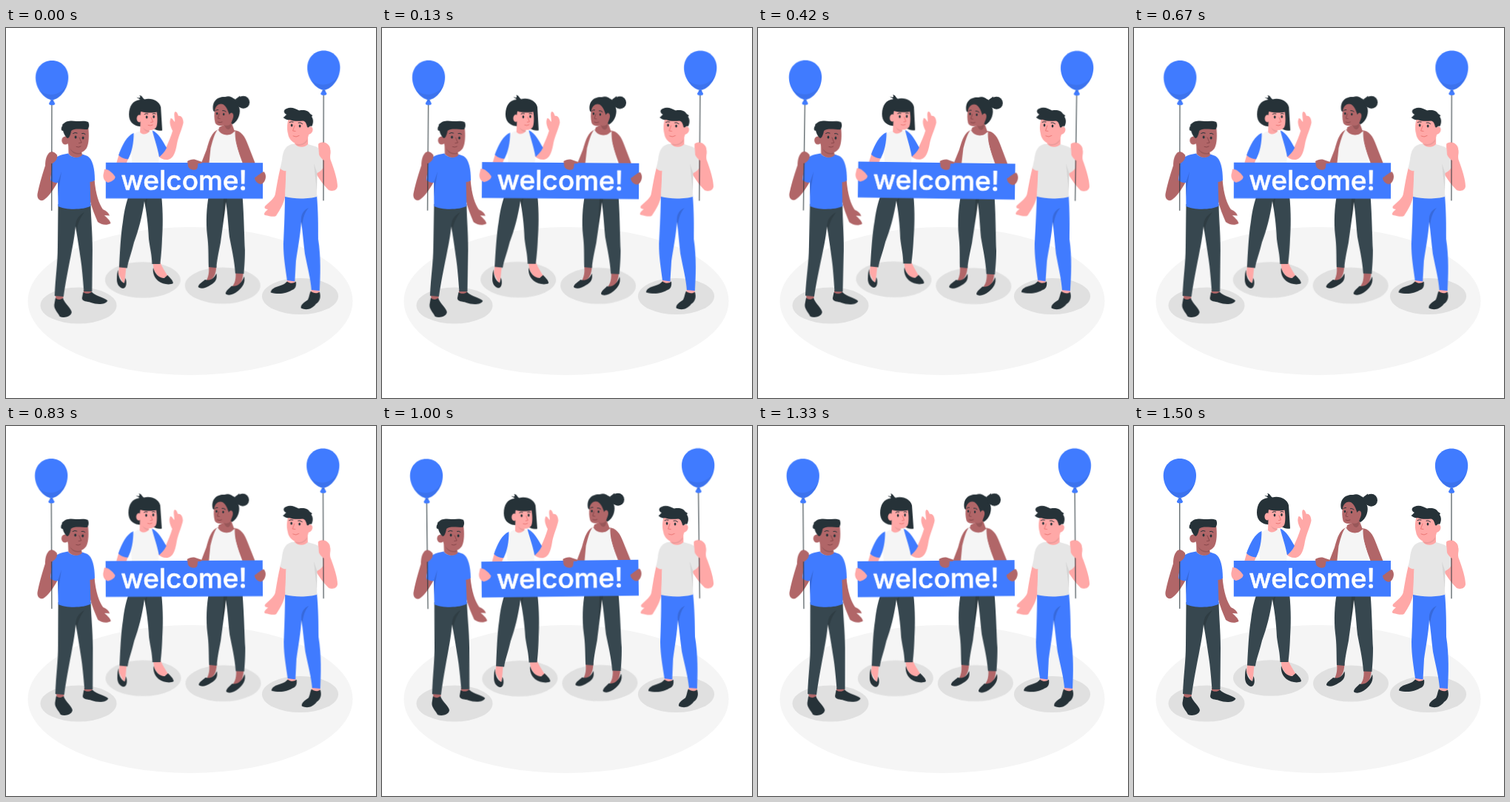
These frames come from a looping animation (500 px wide and 500 px high, 1.54 s). An HTML page:

```html
<!DOCTYPE html>
<html lang="en">
<head>
<meta charset="utf-8">
<title>Welcome</title>
<style>
  html, body { margin: 0; width: 100%; height: 100%; overflow: hidden; background: #fff; }
  svg { display: block; width: 100%; height: 100%; }
  .sway { animation: sway 1540ms linear -40ms infinite; }
  #manL { transform-origin: 91px 217px; }
  #women { transform-origin: 243px 231px; }
  #manR { transform-origin: 400px 206px; }
  @keyframes sway {
    0%, 100% { transform: rotate(0deg); }
    25% { transform: rotate(1deg); }
    75% { transform: rotate(-1deg); }
  }
  .floor { fill: #f5f5f5; }
  .shadow { fill: #e0e0e0; }
  .blue { fill: #407bff; }
  .dark { fill: #263238; }
  .slate { fill: #37474f; }
  .white { fill: #f5f5f5; }
  .grey { fill: #e6e6e6; }
  .pink { fill: #ffa8a7; }
  .brown { fill: #b16668; }
  .shade { fill: #000; opacity: .14; }
  .soft { opacity: .07; }
  .line { fill: none; stroke: #263238; stroke-width: 1; stroke-linecap: round; }
  .nose { fill: none; stroke: #7d3f43; stroke-width: .8; stroke-linecap: round; }
  .pinkNose { fill: none; stroke: #e8716f; stroke-width: .9; stroke-linecap: round; }
  .sign {
    font: 500 37px Inter, "Open Sans", sans-serif; text-anchor: middle;
    fill: #fff; stroke: #fff; stroke-width: .6; stroke-linejoin: round;
  }
</style>
</head>
<body>
<svg viewBox="0 0 500 500">
  <defs>
    <g id="balloon">
      <path class="line" d="M61.8 103V246.5"/>
      <path class="blue" d="M61.8 44C75 44 84 54 84 67C84 82 73 96 62 97.5C51 96 39.7 82 39.7 67C39.7 54 49 44 61.8 44Z"/>
      <path class="shade soft" d="M83 75C76 91 56 95 44 83C49 90 55 96 62 97.5C71 96 80 86 83 75Z"/>
      <path class="blue" d="M62 95L57.8 102Q58 104.500 62 104.300Q66 104.500 66 102Z"/>
      <path class="shade" d="M59 97L62 98L65 97L64 99H60Z"/>
    </g>
  </defs>

  <ellipse class="floor" cx="249" cy="369" rx="219.500" ry="100"/>
  <ellipse class="shadow" cx="98" cy="375" rx="51.500" ry="24.500"/>
  <ellipse class="shadow" cx="397.500" cy="362.500" rx="51.500" ry="24.500"/>

  <g id="manL" class="sway">
    <path class="brown" d="M67 360H78L77 370L68 370ZM105 354H116V361H105Z"/>
    <path class="dark" d="M67 365C71 368 75 367 77 365C80 373 88 378 89 384C88 391 78 392 73 390C70 384 65 380 65.500 374ZM104.500 357C109 360 113 359 116 356.500C122 363 134 364 137.500 368.500C135 374 123 374 115 371C110 369 103 370 103 365Z"/>
    <path class="slate" d="M70.500 238H114.500C115 262 117 275 117 300L116.500 356H105.500C104 338 103 325 101 312C99 298 97 285 94 268C92 292 84 322 78 363L66 362C67 335 70 320 70 295Z"/>
    <path class="shade" d="M94 268C94 259 98 253 106 249C101 256 97 262 95.500 276Z"/>
    <path class="brown" d="M112.500 205L119.500 204C121 225 126 238 131 245C136 247 139 250 140 253.500L133 253C137 257 141 260 141.500 264C136 267 129 266 124 262C120 253 116 243 113 231Z"/>
    <path class="brown" d="M58 169C62 166 66 168 69 172C70 177 66 180 63 184L60 206L70.500 207C64 219 57 229 50 233C44 234 41 229 43 222C46 208 50 195 53 186C53 180 54 173 58 169Z"/>
    <path class="blue" d="M84 169.500C74 171 64 174 62.500 183L60 206C63 208.500 67 209.500 70 209L70.500 241C80 246 105 246 114.500 240.500L113.500 208C116 208 118.500 207 120 205.500C120 190 117 177 110 173L103 170.500C100 176 88 176 84 169.500Z"/>
    <path class="shade" d="M70 209L75 194L72 214L70.500 228Z"/>
    <path class="brown" d="M84 154L84.500 170C90 177 100 176 103 171.500L101 163Z"/>
    <path class="shade" d="M86 161C90 168 96 170 102 167L102 170C94 172 88 169 86 161Z"/>
    <ellipse class="brown" cx="80" cy="152" rx="4.800" ry="5.500"/>
    <path class="brown" d="M86 136C94 134 104 135 111 134C112.500 145 112 156 109 162C106 167 100 170 95 168.500C88 167 84 160 82 152Z"/>
    <path class="dark" d="M75 134C77 132 75 130 78 129C81 125 89 125 95 126C101 126 107 125 111 127C113 131 112 135 110 137C102 137 92 135 88 139C87 145 85 149 83 149C80 147 78 143 77 139C74 139 74.500 136 75 134Z"/>
    <ellipse class="dark" cx="94" cy="147.500" rx="1.400" ry="2"/>
    <ellipse class="dark" cx="104" cy="148.500" rx="1.400" ry="2"/>
    <path class="line" d="M90.500 142.500Q93 140.500 96 142M102.500 142.500Q105 141.500 107 143.500"/>
    <path class="nose" d="M99 148L102 155L98.500 155.500M95 160.500Q98 162 101 160"/>
    <use href="#balloon"/>
    <path class="brown" d="M58 169C62 166 66 168 69 172C70 177 66 181 62.500 183C57 184 54 179 58 169Z"/>
  </g>

  <g id="women" class="sway">
    <ellipse class="shadow" cx="185" cy="340.500" rx="51" ry="24.300"/>
    <ellipse class="shadow" cx="293" cy="348" rx="51" ry="24.500"/>

    <path class="pink" d="M153.500 320L163 321C161 333 162 340 159 346L152 332ZM198.500 317H208.500C212 325 216 330 219 336L208 339L200 327Z"/>
    <path class="dark" d="M151.500 327C152 336 154 342 160 345L161.500 338C164 344 163 352 158 352C153 351 150 346 150 340C150 334 150.500 330 151.500 327ZM199 324C201 331 206 338 214 338L218.500 334C222 338 226 341 226 345C221 348 211 346 206 342C201 338 198 331 199 324Z"/>
    <path class="slate" d="M166 226H210C212.500 250 212 270 211 285C210.500 300 209.500 310 208.500 319H197.500C197 305 195 300 193 285C192 265 190 250 187 234C184 255 179 274 173 290C170 303 165 316 164 324.500L153 323.500C154 305 155 280 158 262C160 245 163 235 166 226Z"/>
    <path class="shade" d="M187 234L191 230L189 244Z"/>
    <path class="pink" d="M153.500 168L166 174L160 190H147Z"/>
    <path class="pink" d="M216 162C220 153 223 146 225 139C222 133 220 127 222.500 122C224.500 121.500 226 125 228 127C228 121 226 115 228.500 113C231 113 232 117 233 119C237 118 239.500 123 239.500 128C238 136 233 146 231 156C229 168 226 178 217 178C212 178 208 176 205 172Z"/>
    <path class="white" d="M182 139.500C174 140 169 147 168 158L171 190H206L207 164C206 146 202 140 193 139Z"/>
    <path class="blue" d="M172.500 142C163 146 157 158 152 172C156 176 160 177 165 177.500C170 168 172.500 156 172.500 142ZM197.500 138.500C206 142 211 152 217 162C214 168 210 172 207 174.500C205 163 201 152 197.500 138.500Z"/>
    <path class="dark" d="M180 91C184 91 184 95 187 96.500C197 94 207 99 209 107L211 138.500C206 139.500 203 138 199 136L180 133C171 132 166 126 166 117C166 106 171 98 181 97C179 95 177 95 176.500 93.500C179 95 183 95 180 91Z"/>
    <path class="pink" d="M181.500 127L181 141C185 145 190 144 193.500 140L194 133Z"/>
    <path class="shade soft" d="M185 134C188 138 192 139 194 138.500L193.500 141C189 141 186 138 185 134Z"/>
    <ellipse class="pink" cx="180" cy="122.500" rx="3.500" ry="5"/>
    <path class="pink" d="M182 113C190 115 198 115 203.500 113.500C205 122 204.500 131 203 134C199 140 190 139 186 135.500C181 131 180.500 122 182 113Z"/>
    <ellipse class="dark" cx="190" cy="120.500" rx="1.300" ry="1.900"/>
    <ellipse class="dark" cx="199.500" cy="120" rx="1.300" ry="1.900"/>
    <path class="line" d="M187 116.500Q189 115 191.500 116M198 116Q200 115 202 116"/>
    <path class="pinkNose" d="M196 121L198.500 127L195.500 127.500M192 131.500Q195 133 198 131"/>

    <path class="brown" d="M274 321H284.500C284 333 281 341 270 343C274 336 275 330 274 321ZM310.500 329H321C320 344 316 351 304 352C310 345 311 339 310.500 329Z"/>
    <path class="dark" d="M284.500 331.500C286 339 283 344 277 347C270 352 263 353 260 350C260 346 266 343 269 340C276 342 281 339 284.500 331.500ZM322 335.500C324 344 320 350 314 355C307 361 300 362 297 359C297 355 302 352 305 348.500C312 350 318 346 322 335.500Z"/>
    <path class="slate" d="M274 226H319.500C322 260 322 285 323 300C323 315 322 325 321.500 332L310 331.500C309 315 305 298 302 282C300 262 299 245 297 235C295 255 292 275 290 290C287 305 285 315 284.500 324L274 323C273.500 305 274 295 272 280C270 262 271 242 274 226Z"/>
    <path class="shade" d="M294 230H299L297 246C295 254 294 260 292 264Z"/>
    <path class="brown" d="M287 137C278 140 275 150 271 164L264 182L276 186C281 170 284 156 287 137ZM307 138C318 138 323 147 327 158L338 186H321C316 172 310 158 307 138Z"/>
    <path class="white" d="M286 137C282 142 280 149 276.500 162L274 186H317C317 168 309 160 309.500 139C304 146 292 145 286 137Z"/>
    <path class="brown" d="M288 134L287 138C291 146 305 147 308.500 138.500L304 126Z"/>
    <circle class="dark" cx="320.500" cy="100.200" r="8.500"/>
    <path class="dark" d="M280 112C277 98 287 92 296 93C301 91 305 93 307 95C312 97 314 101 314.500 106C318 113 314 126 306 130L284 115Z"/>
    <path class="dark" d="M310 96L316 91.500L318 105L312 106Z"/>
    <path class="brown" d="M282 111C283 104 289 101 293 103C298 106 300 112 301.500 117C304 112 308 115 307 120C306 125 304 126 304 132C300 137 297 137 295 131C290 133 284 132 282.500 128C281 122 281 116 282 111Z"/>
    <path class="shade" d="M295 131C299 133 302 131 304 129L304 133C302 139 297 138 295 131Z"/>
    <ellipse class="dark" cx="285" cy="115.500" rx="1.200" ry="1.800"/>
    <ellipse class="dark" cx="294" cy="116.500" rx="1.200" ry="1.800"/>
    <path class="line" d="M283 111.500Q284.500 110 286.500 110.500M292.500 111.500Q295 111 297 113"/>
    <path class="nose" d="M288 116L286 122L289 122.500M286 127Q289 128.500 292 127"/>

    <rect class="blue" x="134.800" y="182" width="212.200" height="48.500"/>
    <text class="sign" x="240.500" y="218.500">welcome!</text>
    <path class="pink" d="M133 191C139 191 144 196 147.500 201C148 205 142 208 138 209C133 208 130 202 132 196Z"/>
    <path class="brown" d="M245 180C249 177 255 176.500 259 179L265 181L264 183L259.500 183C259 187 259 190 257 191C252 193 247 190 246 187Z"/>
    <path class="brown" d="M348.500 194C353 199 351 207 346 210.500C341 211.500 336 207 336 202C340 200 343 196 348.500 194Z"/>
  </g>

  <g id="manR" class="sway">
    <path class="pink" d="M380 339H390.500V347H380ZM413 352H424V361H412Z"/>
    <path class="dark" d="M380 342.500C385 346 389 345 392 342.500C393 349 391 353 386 354.500C380 358 370 361 358 357.500C358 353 364 350 370 348.500C375 347 378 345 380 342.500ZM412 355.500C416 359 421 359 424 356.500C426 363 425 369 419 373C414 380 406 382 399 378.500C398 374 403 371 408 367.500C410 364 410 360 412 355.500Z"/>
    <path class="blue" d="M377 225H420C422 250 422 265 422 285C426 310 425 335 424 355L413 354C412 340 408 325 404 305C402 290 401 275 399 262C398 280 394 300 392 315L390.500 342.500L380 341C378 325 375 310 375 292C376 270 377 245 377 225Z"/>
    <path class="shade" d="M399 262C398 252 402 246 409 243C404 249 401 256 400 270Z"/>
    <path class="pink" d="M371 188L379 190L377.500 226C376 236 371 245 365 254C361 256 356 254 350 253C347 251 351 248 354 245C349 245 348 242 352 239C357 234 363 230 364 224C366 212 368 200 371 188Z"/>
    <path class="pink" d="M422 157C426 153 433 154 437 160C440 168 437 172 438.500 178C444 192 448 206 448 214C447 220 441 221 436 219C429 212 424 205 419 197L428 188C428 182 426 176 423 171Z"/>
    <path class="grey" d="M390 156.500C378 157 374 166 373 178L370.500 190C373 192.500 376 193.500 378.500 193L377 228C390 231.500 410 231 420 228L420.500 196C424 194 427 192 428.500 189C429 176 427 163 418 160L408 157Z"/>
    <path class="shade soft" d="M420.500 196L416 183L418.500 207L420 220Z"/>
    <path class="pink" d="M391 148L390 156.500C394 162 404 162 408 157L408 140Z"/>
    <path class="shade soft" d="M392 155C397 158 403 155 407 150V153C403 159 396 160 392 158Z"/>
    <path class="pink" d="M382 121C392 124 402 123 406 128C407 132 409 134 411 133C416 133 416 142 409 144C408 150 404 156 397 157C389 157 382 151 381 143C379 135 380 129 382 121Z"/>
    <path class="dark" d="M374.500 121C377 120 377 118 379 117C375 115 374 111 379 109C385 106 391 109 396 111.500C403 110 409 112 411 116L414 118L413 120C416 124 415 130 413 133C410 131 409 136 407 134C406 130 405 126 401 125.500C394 126 388 126 383 124C380 125 377 123 374.500 121Z"/>
    <ellipse class="dark" cx="386" cy="131.500" rx="1.300" ry="1.900"/>
    <ellipse class="dark" cx="397" cy="132.500" rx="1.300" ry="1.900"/>
    <path class="line" d="M383 127.500Q385 126 388 127M395 128Q398 127 400.500 129.500"/>
    <path class="pinkNose" d="M390 132L387.500 139L391 139.500M388 146Q392 148.500 396 145.500"/>
    <use href="#balloon" x="367.200" y="-13.600"/>
    <path class="pink" d="M422 157C426 153 433 154 437 160C440 168 437 174 437 180C431 182 425 176 423 171Z"/>
  </g>
</svg>
</body>
</html>
```
